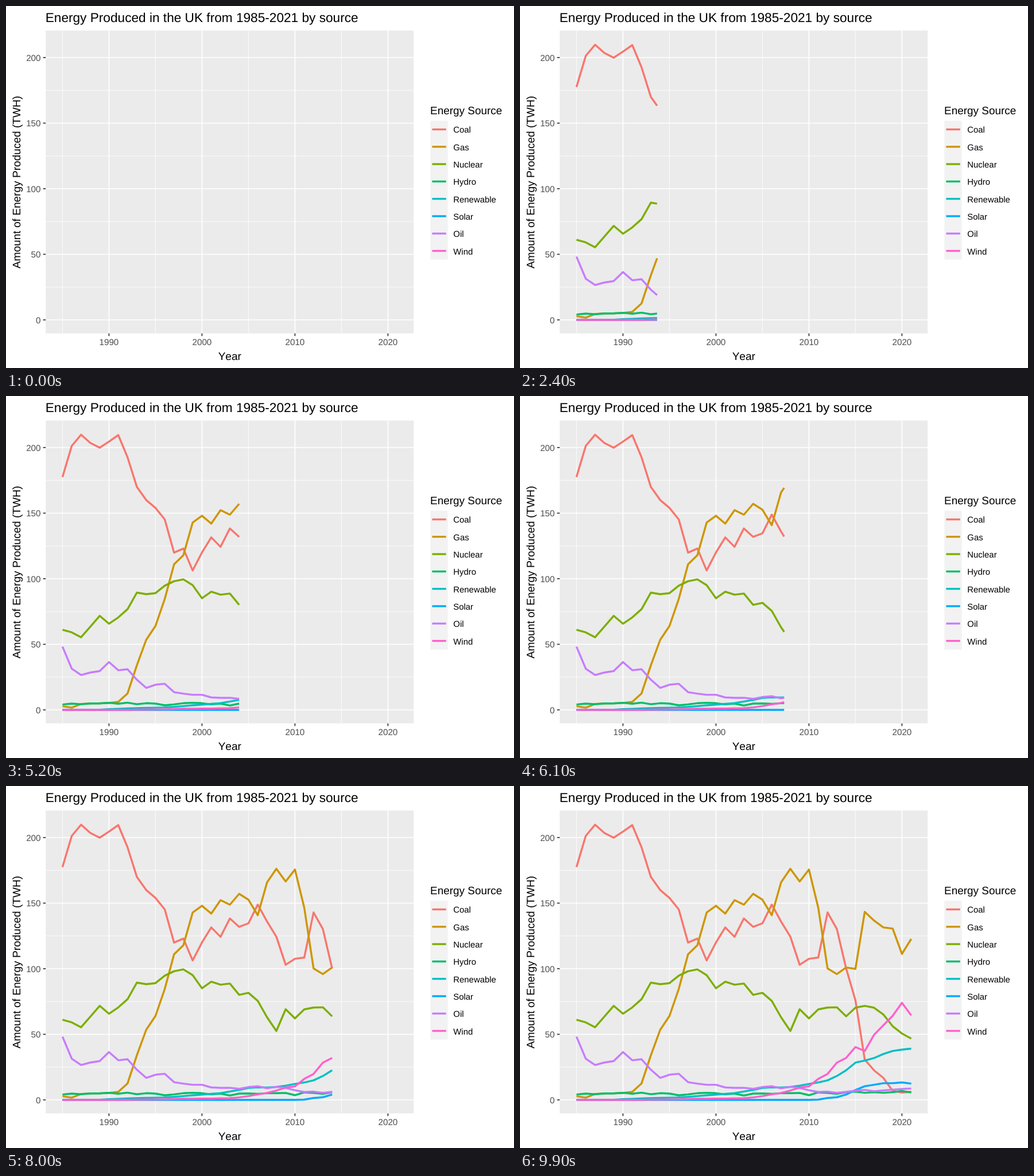
An HTML page with a canvas for the animation above (10000 ms loop, 885 by 632 pixels).

```html
<!DOCTYPE html>
<html lang="en">
<head>
<meta charset="utf-8">
<title>Energy Produced in the UK</title>
<style>
  html, body { margin: 0; width: 885px; height: 632px; overflow: hidden; background: #fff; }
  canvas, svg { position: absolute; left: 0; top: 0; width: 885px; height: 632px; }
  text {
    font-family: "Liberation Sans", Arial, sans-serif;
    font-kerning: none;
    text-rendering: geometricPrecision;
  }
</style>
</head>
<body>
<canvas id="plot" width="885" height="632"></canvas>
<svg id="labels" viewBox="0 0 885 632"></svg>
<script>
const FRAMES = 100, STEP = 100, FIRST = 1985, LAST = 2021;
const panel = { left: 69.2, top: 42.8, right: 710.2, bottom: 571.6 };
const key = { x: 739.4, y: 200.3, size: 30.3 };
const ctx = document.getElementById("plot").getContext("2d");
const svg = document.getElementById("labels");

const xOf = year => 98.4 + (year - FIRST) * 16.2;
const yOf = twh => 548 - twh * 2.29;

// Yearly values in TWh; missing leading years are zero.
const series = [];
function add(name, color, values) {
  const zeros = Array(LAST - FIRST + 1 - values.length).fill(0);
  series.push({ name, color, values: zeros.concat(values) });
}
add("Coal", "#F8766D", [
  177.5, 201.3, 209.8, 203.5, 199.9, 204.5, 209.5, 192.5, 170, 160,
  154, 145.2, 119.9, 123, 106.3, 120, 131.5, 124.3, 138.3, 131.9,
  134.6, 148.9, 136, 124.4, 103, 107.6, 108.5, 142.9, 130.3, 100.2,
  75.9, 30.7, 22.5, 16.8, 6.9, 5.5, 6.2]);
add("Gas", "#CD9600", [
  2.8, 1.7, 4.5, 4.9, 5, 5.3, 6.1, 12.6, 34, 53.4,
  64, 84.6, 111, 117.9, 142.8, 148, 142, 152.3, 148.8, 157.1,
  152.6, 140.8, 165.8, 176.2, 166.5, 175.6, 146.5, 100.2, 95.9, 100.9,
  99.9, 143.4, 136.7, 131.5, 130.6, 111.3, 122.7]);
add("Nuclear", "#7CAE00", [
  61.1, 59.1, 55.4, 63.5, 71.7, 65.7, 70.5, 76.8, 89.4, 88.2,
  89, 94.7, 98.1, 99.5, 95.1, 85.1, 90.1, 87.8, 88.7, 80.1,
  81.6, 75.5, 63, 52.5, 69.1, 62.1, 69, 70.4, 70.6, 63.7,
  70.3, 71.7, 70.3, 65.1, 56.2, 50.6, 46.7]);
add("Hydro", "#00BE67", [
  4.1, 4.8, 4.3, 4.9, 4.9, 5.4, 4.7, 5.5, 4.3, 5.1,
  4.8, 3.5, 4.2, 5.1, 5.4, 5.1, 4.2, 4.8, 3.3, 4.8,
  4.9, 4.6, 5.1, 5.1, 5.3, 3.6, 5.7, 5.3, 4.7, 5.9,
  6.3, 5.4, 5.9, 5.4, 5.9, 6.8, 5.6]);
add("Renewable", "#00BFC4", [
  0.1, 0.6, 0.8, 1.1, 1.3, 1.5, 1.7, 1.9, 2.3, 2.9, 3.5, 4,
  4.6, 5.2, 6.4, 7.6, 9.1, 9.6, 9.4, 9.8, 10.8, 12.2, 13.3,
  14.9, 18.2, 22.6, 28.4, 30, 31.9, 35, 37.3, 38.3, 39.1]);
add("Solar", "#00A9FF", [
  0.2, 1.4, 2, 4.1, 7.5, 10.4, 11.5, 12.7, 12.7, 13.3, 12.4]);
add("Oil", "#C77CFF", [
  48.2, 31.4, 26.6, 28.5, 29.6, 36.5, 30.2, 31, 23, 16.8,
  19.2, 19.9, 13.5, 12.4, 11.5, 11.5, 9.5, 9.2, 9.2, 8.4,
  9.8, 10.4, 8.8, 10, 9.1, 7.4, 6, 6.3, 5.4, 6.1,
  7, 7.6, 6.6, 7.2, 7.8, 8.3, 8.7]);
add("Wind", "#FF61CC", [
  0.2, 0.35, 0.4, 0.5, 0.65, 0.85, 0.85, 0.95, 0.97, 1.25,
  1.3, 1.9, 2.9, 4.2, 5.3, 7.1, 9.3, 10.3, 16, 19.8,
  28.4, 32, 40.3, 37.2, 49.6, 56.9, 64.1, 74, 64.4]);

// Frame at which each year is reached, halves rounding to even.
function roundEven(v) {
  const low = Math.floor(v);
  return v - low === 0.5 ? low + low % 2 : Math.round(v);
}
const arrival = Array.from({ length: LAST - FIRST + 1 }, (_, i) =>
  roundEven(i * (FRAMES - 1) / (LAST - FIRST)));

function line(x1, y1, x2, y2, color, width) {
  ctx.strokeStyle = color;
  ctx.lineWidth = width;
  ctx.beginPath();
  ctx.moveTo(x1, y1);
  ctx.lineTo(x2, y2);
  ctx.stroke();
}
const vGrid = (year, w) => line(xOf(year), panel.top, xOf(year), panel.bottom, "#fff", w);
const hGrid = (twh, w) => line(panel.left, yOf(twh), panel.right, yOf(twh), "#fff", w);

function drawBase() {
  ctx.fillStyle = "#fff";
  ctx.fillRect(0, 0, 885, 632);
  ctx.fillStyle = "#EBEBEB";
  ctx.fillRect(panel.left, panel.top, panel.right - panel.left, panel.bottom - panel.top);
  for (let y = 1985; y <= 2015; y += 10) vGrid(y, 0.85);
  for (let v = 25; v <= 175; v += 50) hGrid(v, 0.85);
  for (let y = 1990; y <= 2020; y += 10) {
    vGrid(y, 1.7);
    line(xOf(y), panel.bottom, xOf(y), panel.bottom + 4.6, "#333", 1.7);
  }
  for (let v = 0; v <= 200; v += 50) {
    hGrid(v, 1.7);
    line(panel.left - 4.6, yOf(v), panel.left, yOf(v), "#333", 1.7);
  }
  ctx.fillStyle = "#F2F2F2";
  ctx.fillRect(key.x, key.y, key.size, key.size * series.length);
  series.forEach((s, i) => {
    const y = key.y + key.size * (i + 0.5);
    line(key.x + 3, y, key.x + key.size - 3, y, s.color, 3.4);
  });
}

function drawSeries(s, frame) {
  let i = 0;
  ctx.strokeStyle = s.color;
  ctx.lineWidth = 3.4;
  ctx.lineJoin = "round";
  ctx.beginPath();
  ctx.moveTo(xOf(FIRST), yOf(s.values[0]));
  while (i + 1 < arrival.length && arrival[i + 1] <= frame) {
    i++;
    ctx.lineTo(xOf(FIRST + i), yOf(s.values[i]));
  }
  if (i + 1 < arrival.length) {
    const part = (frame - arrival[i]) / (arrival[i + 1] - arrival[i]);
    const value = s.values[i] + part * (s.values[i + 1] - s.values[i]);
    if (part > 0) ctx.lineTo(xOf(FIRST + i + part), yOf(value));
  }
  ctx.stroke();
}

function label(str, x, y, size, anchor = "start", fill = "#000", turn = 0) {
  const el = document.createElementNS("http://www.w3.org/2000/svg", "text");
  el.textContent = str;
  el.setAttribute("font-size", size);
  el.setAttribute("text-anchor", anchor);
  el.setAttribute("fill", fill);
  el.setAttribute("transform", `translate(${x} ${y}) rotate(${turn})`);
  svg.append(el);
}

label("Energy Produced in the UK from 1985-2021 by source", 68.7, 28.3, 22.65);
label("Year", 389.8, 618, 19.1, "middle");
label("Amount of Energy Produced (TWH)", 25.2, 307.5, 19.1, "middle", "#000", -90);
label("Energy Source", 739, 189, 18.95);
for (let y = 1990; y <= 2020; y += 10) label(y, xOf(y), 592.4, 15.2, "middle", "#4D4D4D");
for (let v = 0; v <= 200; v += 50) label(v, 60.5, yOf(v) + 5.8, 15.2, "end", "#4D4D4D");
series.forEach((s, i) => label(s.name, 779.3, key.y + key.size * (i + 0.5) + 6, 14.9));

let shown = -1;
function tick() {
  const frame = Math.floor(performance.now() / STEP) % FRAMES;
  if (frame !== shown) {
    shown = frame;
    drawBase();
    if (frame > 0) series.forEach(s => drawSeries(s, frame));
  }
  requestAnimationFrame(tick);
}
tick();
</script>
</body>
</html>
```
